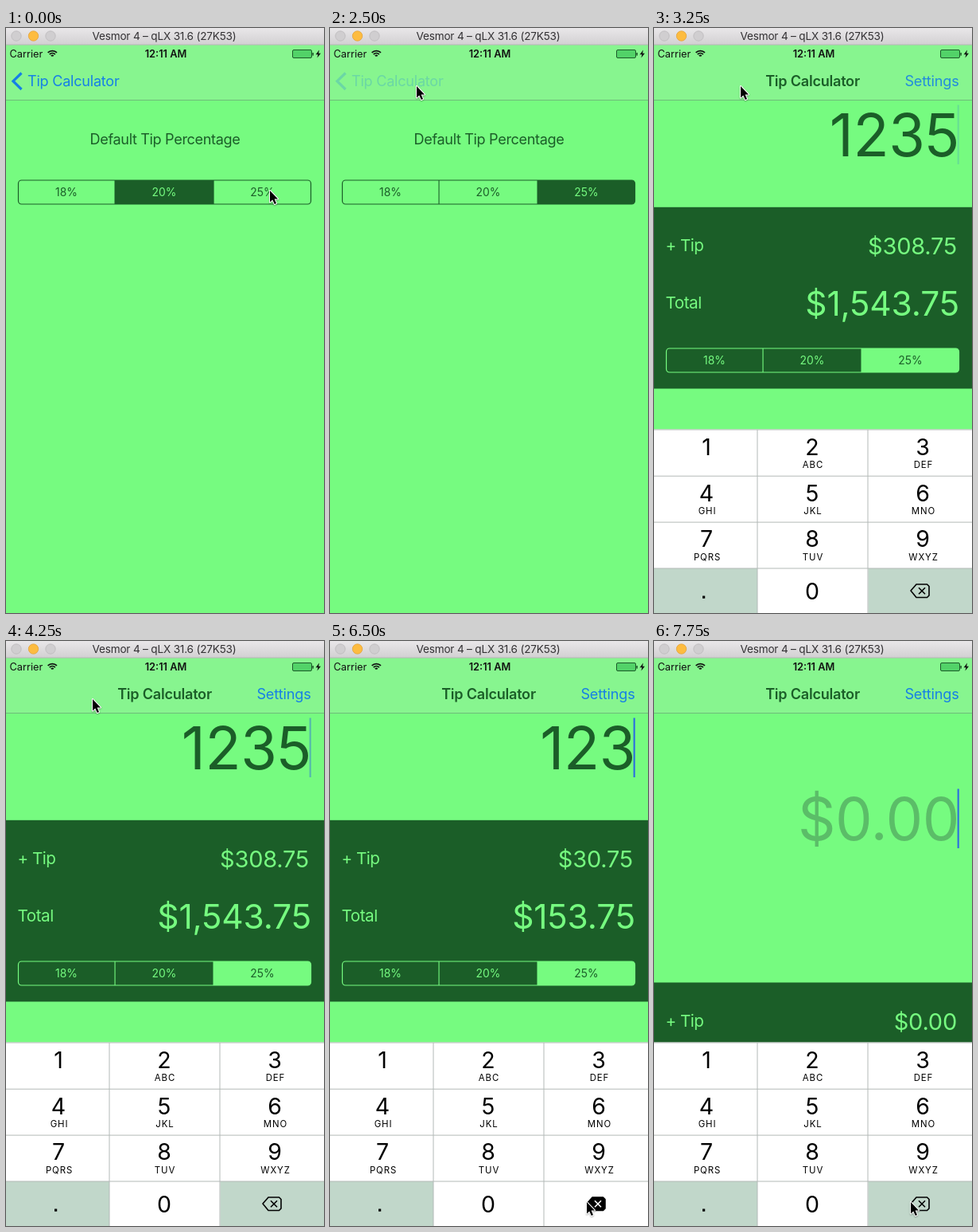
These frames come from a looping animation (400x734 px, 8 s). An HTML page with a canvas:

```html
<!DOCTYPE html>
<html lang="en">
<head>
<meta charset="utf-8">
<title>Tip Calculator</title>
<style>
  html, body { margin: 0; width: 100%; height: 100%; overflow: hidden; background: #76fb80; }
  canvas { display: block; width: 400px; height: 734px; }
</style>
</head>
<body>
<canvas id="stage" width="400" height="734"></canvas>
<script>
const ctx = document.getElementById('stage').getContext('2d');
const LOOP = 8000, STEP = 250;
const LIGHT = '#76fb80', DARK = '#1b5e28', BLUE = '#167fe6';
const RATES = [18, 20, 25];
const LETTERS = ['', 'ABC', 'DEF', 'GHI', 'JKL', 'MNO', 'PQRS', 'TUV', 'WXYZ'];
const COLUMNS = [66, 199, 338];

// Pointer stops: time, x, y
const POINTER = [
  [0, 332, 204], [1000, 332, 204], [2000, 109, 73], [4250, 109, 73],
  [5250, 130, 211], [6250, 323, 704], [LOOP, 323, 704]
];

function rect(x, y, w, h, color) {
  ctx.fillStyle = color;
  ctx.fillRect(x, y, w, h);
}

// y is the middle of the capital height
function text(str, x, y, size, color, { align = 'left', weight = 400, gap = 0, alpha = 1 } = {}) {
  ctx.save();
  ctx.globalAlpha *= alpha;
  ctx.font = `${weight} ${size}px Inter, sans-serif`;
  ctx.letterSpacing = gap + 'px';
  ctx.textAlign = align;
  ctx.fillStyle = color;
  ctx.fillText(str, x, y + size * 0.364);
  ctx.restore();
}

function polygon(points, close = true) {
  ctx.beginPath();
  points.forEach(([x, y]) => ctx.lineTo(x, y));
  if (close) ctx.closePath();
}

function stroke(color, width) {
  ctx.strokeStyle = color;
  ctx.lineWidth = width;
  ctx.stroke();
}

function pointerAt(t) {
  const i = POINTER.findIndex((p, k) => k > 0 && t < p[0]);
  const [t0, x0, y0] = POINTER[i - 1], [t1, x1, y1] = POINTER[i];
  const u = (t - t0) / (t1 - t0), e = u * u * (3 - 2 * u);
  return [x0 + (x1 - x0) * e, y0 + (y1 - y0) * e];
}

function drawPointer(t) {
  const [x, y] = pointerAt(t);
  ctx.save();
  ctx.translate(x, y);
  ctx.shadowColor = 'rgba(0,0,0,.3)';
  ctx.shadowBlur = 2;
  ctx.shadowOffsetY = 1;
  polygon([[0, 0], [0, 14.5], [3.3, 11.4], [5.8, 17], [8, 16], [5.6, 10.6], [10, 10.4]]);
  ctx.lineJoin = 'round';
  stroke('#fff', 2);
  ctx.shadowColor = 'transparent';
  ctx.fillStyle = '#000';
  ctx.fill();
  ctx.restore();
}

function drawWindowBar() {
  const shade = ctx.createLinearGradient(0, 0, 0, 21);
  shade.addColorStop(0, '#e9e7e9');
  shade.addColorStop(1, '#d2d0d2');
  rect(0, 0, 400, 21, shade);
  rect(0, 20.5, 400, 1, '#b9b5b9');
  [[13, '#d0ced0', '#bbb9bb'], [34.5, '#fdbc40', '#e2a33a'], [56, '#d0ced0', '#bbb9bb']].forEach(([x, fill, edge]) => {
    ctx.beginPath();
    ctx.arc(x, 10, 6.2, 0, 7);
    ctx.fillStyle = fill;
    ctx.fill();
    stroke(edge, 0.8);
  });
  text('Vesmor 4 – qLX 31.6 (27K53)', 199, 10, 13.6, '#333134', { align: 'center', gap: -0.2 });
}

function drawStatus() {
  text('Carrier', 4.5, 32.5, 12.8, '#111');
  text('12:11 AM', 201, 32.5, 12.8, '#111', { align: 'center', weight: 600 });
  for (const r of [2, 5, 8]) {
    ctx.beginPath();
    ctx.arc(58.3, 36.6, r, -Math.PI * 0.75, -Math.PI * 0.25);
    stroke('#111', 1.8);
  }
  ctx.beginPath();
  ctx.roundRect(360.5, 27.5, 24, 10, 1.5);
  ctx.fillStyle = '#52d268';
  ctx.fill();
  stroke('#1d5b2a', 1);
  rect(385.3, 31, 1.6, 3.6, '#1d5b2a');
  polygon([[394, 27.5], [389.6, 33.2], [392.4, 33.2], [391.4, 37.6], [396, 31.7], [393.2, 31.7]]);
  ctx.fillStyle = '#111';
  ctx.fill();
}

function drawBarBack() {
  rect(0, 21, 400, 69.5, '#87f58f');
  rect(0, 90, 400, 1, '#6fbd7a');
  drawStatus();
}

function drawSettingsLink(alpha) {
  text('Settings', 383.5, 66.5, 18.1, BLUE, { align: 'right', gap: -0.2, alpha });
}

function drawSegments(y, selected, ink, paper) {
  const edges = [15.5, 137, 261, 383.5];
  ctx.save();
  ctx.beginPath();
  ctx.roundRect(15.5, y, 368, 30, 4);
  ctx.save();
  ctx.clip();
  rect(edges[selected], y, edges[selected + 1] - edges[selected], 30, ink);
  rect(136.5, y, 1.1, 30, ink);
  rect(260.5, y, 1.1, 30, ink);
  ctx.restore();
  stroke(ink, 1.2);
  RATES.forEach((rate, i) =>
    text(rate + '%', [76, 199, 322.5][i], y + 15, 13.9, i === selected ? paper : ink, { align: 'center' }));
  ctx.restore();
}

function drawSettings(t) {
  const leaving = t >= 2750;
  rect(0, 21, 400, 713, LIGHT);
  ctx.save();
  ctx.translate(leaving ? 328.5 : 0, 0);
  text('Default Tip Percentage', 200, 139, 18.1, DARK, { align: 'center', gap: -0.35 });
  drawSegments(191, t < 500 ? 1 : 2, DARK, LIGHT);
  ctx.restore();
  drawBarBack();
  if (leaving) {
    drawSettingsLink(0.15);
    const shadow = ctx.createLinearGradient(321, 0, 327, 0);
    shadow.addColorStop(0, '#fff');
    shadow.addColorStop(1, '#e9f3ea');
    rect(0, 21, 326.5, 713, shadow);
    return;
  }
  ctx.save();
  ctx.globalAlpha = t >= 2500 ? 0.25 : 1;
  polygon([[19.5, 56.5], [9, 66.7], [19.5, 77]], false);
  stroke(BLUE, 3.2);
  text('Tip Calculator', 27, 66.5, 18.1, BLUE, { gap: -0.25 });
  ctx.restore();
}

function drawDeleteKey(pressed) {
  rect(269.5, 678, 130.5, 56, pressed ? '#fff' : '#c1d7ca');
  polygon([[323, 706], [330, 698], [343.5, 698], [346, 700.5], [346, 712], [343.5, 714.5], [330, 714.5]]);
  ctx.lineJoin = 'round';
  if (pressed) {
    ctx.fillStyle = '#000';
    ctx.fill();
  }
  stroke('#000', 1.6);
  ctx.beginPath();
  for (const d of [-1, 1]) {
    ctx.moveTo(337 - 4, 706.2 - 4 * d);
    ctx.lineTo(337 + 4, 706.2 + 4 * d);
  }
  stroke(pressed ? '#fff' : '#000', 1.6);
}

function drawKeyboard(pressed) {
  rect(0, 503.5, 400, 231, '#fff');
  rect(0, 678, 130, 56, '#c1d7ca');
  drawDeleteKey(pressed);
  for (const y of [503.5, 561.7, 619.6, 677.5]) rect(0, y, 400, 1, '#b4bab7');
  for (const x of [129.5, 268.5]) rect(x, 504, 1, 230, '#b4bab7');
  LETTERS.forEach((letters, i) => {
    const x = COLUMNS[i % 3], y = 525.5 + 57.7 * Math.floor(i / 3);
    text(String(i + 1), x, y, 28.5, '#000', { align: 'center' });
    text(letters, x + 1, y + 22.7, 11.4, '#000', { align: 'center', gap: 0.9 });
  });
  text('0', 199, 706.5, 28.5, '#000', { align: 'center' });
  rect(61, 712.5, 3.2, 3.2, '#000');
}

function amountAt(t) {
  const presses = [6500, 7000, 7250, 7750].filter(at => t >= at).length;
  return '1235'.slice(0, 4 - presses);
}

function caretAlpha(t) {
  if (t >= 6500) return 1;
  return 0.55 + 0.45 * Math.cos((t - 5400) / 900 * 2 * Math.PI);
}

function money(value) {
  return '$' + value.toLocaleString('en-US', { minimumFractionDigits: 2, maximumFractionDigits: 2 });
}

function drawCalculator(t) {
  const entry = amountAt(t), bill = Number(entry), tip = bill * 0.25;
  const empty = entry === '';
  const entryShift = empty ? 89 : 0, panelShift = empty ? 203.7 : 0;
  const right = { align: 'right' };
  rect(0, 21, 400, 713, LIGHT);
  drawBarBack();
  text('Tip Calculator', 199.5, 66.5, 18.1, DARK, { align: 'center', weight: 600, gap: -0.25 });
  drawSettingsLink(t < 3250 ? 0.6 : t < 3500 ? 0.9 : 1);

  text(empty ? '$0.00' : entry, 384, 134.5 + entryShift, 74, empty ? '#5bbd68' : DARK, { ...right, gap: -0.4 });
  ctx.globalAlpha = caretAlpha(t);
  rect(381.6, 96.5 + entryShift, 2.2, 74.5, '#2f72dc');
  ctx.globalAlpha = 1;

  ctx.save();
  ctx.translate(0, panelShift);
  rect(0, 224.8, 400, 227.7, DARK);
  text('+ Tip', 14.5, 272.5, 20.7, LIGHT, { gap: -0.5 });
  text(money(tip), 381, 273.3, 29, LIGHT, { ...right, gap: -0.2 });
  text('Total', 14.5, 344.8, 20.7, LIGHT, { gap: -0.5 });
  text(money(bill + tip), 384, 345.6, 42.5, LIGHT, { ...right, gap: -0.1 });
  drawSegments(402, 2, LIGHT, DARK);
  ctx.restore();

  drawKeyboard(t === 6500 || (t >= 7000 && t < 7750));
}

function draw(time) {
  const t = Math.floor(time % LOOP / STEP) * STEP;
  if (t < 3000) drawSettings(t);
  else drawCalculator(t);
  drawWindowBar();
  drawPointer(t);
}

function tick(now) {
  draw(now);
  requestAnimationFrame(tick);
}

draw(0);
requestAnimationFrame(tick);
</script>
</body>
</html>
```
